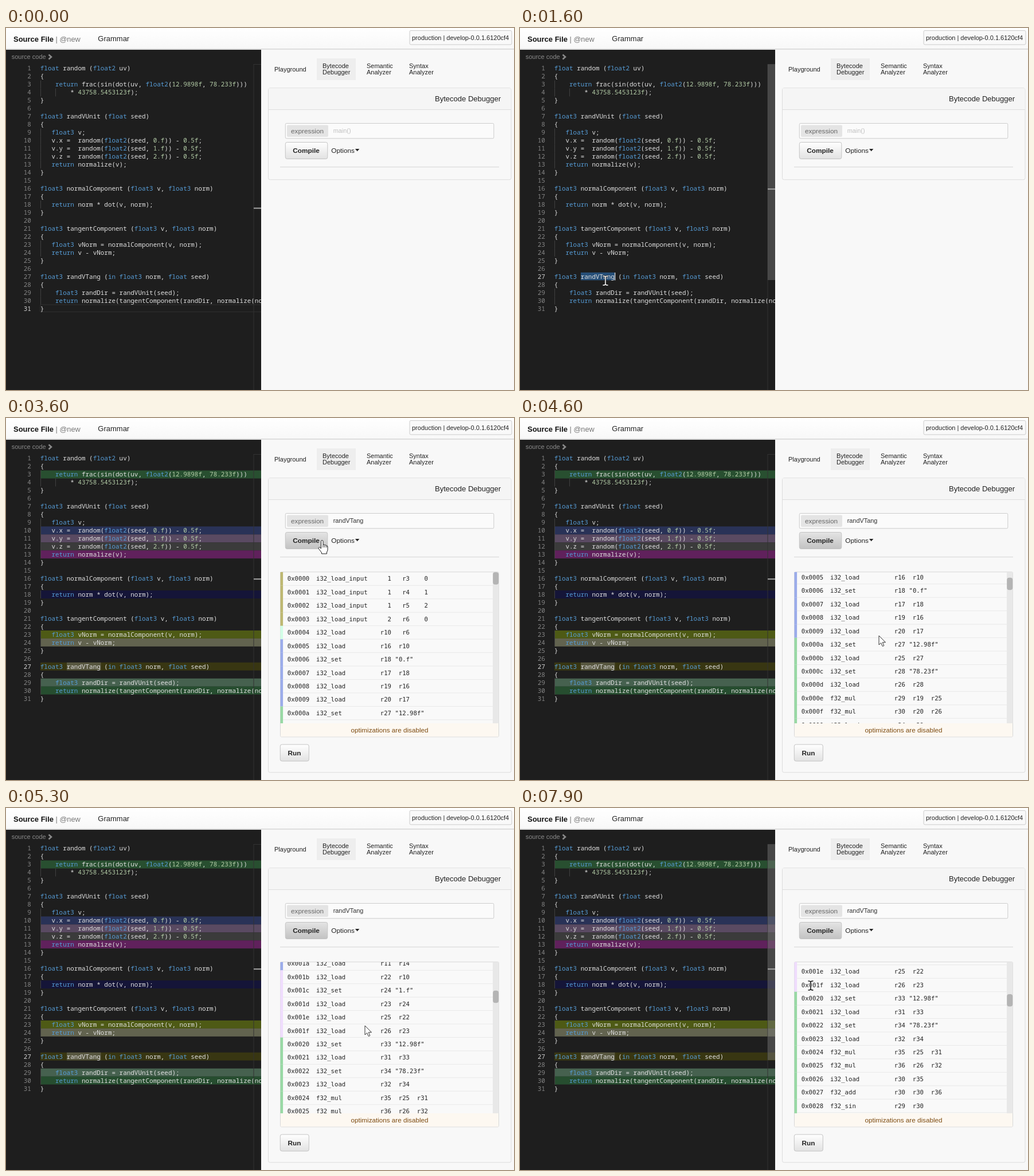
An HTML page for the animation above (8 s loop, 886 by 632 pixels).

```html
<!DOCTYPE html>
<html lang="en">
<head>
<meta charset="utf-8">
<title>Bytecode debugger</title>
<style>
html, body { margin: 0; width: 100%; height: 100%; overflow: hidden; background: #f8f8f8; }
svg { display: block; width: 886px; height: 632px; }
text { white-space: pre; font-family: "Liberation Sans", Arial, sans-serif; fill: #222; }
.code text { font: 10.94px "Noto Sans Mono", monospace; fill: #e0e0e0; }
.code .num { fill: #858585; text-anchor: end; }
.code .num.on { fill: #d0d0d0; font-weight: 500; }
.k { fill: #569cd6; }
.n { fill: #b5cea8; }
#rows text { font: 10.63px "DejaVu Sans Mono", monospace; fill: #222; }
.end { text-anchor: end; }
</style>
</head>
<body>
<svg id="stage" viewBox="0 0 886 632" xmlns="http://www.w3.org/2000/svg"></svg>
<script>
const LOOP = 8000, STEP = 100;
const LINE = 13.97, ROW = 23.45, LIST_TOP = 269;

const source = `float random (float2 uv)
{
    return frac(sin(dot(uv, float2(12.9898f, 78.233f)))
        * 43758.5453123f);
}

float3 randVUnit (float seed)
{
   float3 v;
   v.x =  random(float2(seed, 0.f)) - 0.5f;
   v.y =  random(float2(seed, 1.f)) - 0.5f;
   v.z =  random(float2(seed, 2.f)) - 0.5f;
   return normalize(v);
}

float3 normalComponent (float3 v, float3 norm)
{
   return norm * dot(v, norm);
}

float3 tangentComponent (float3 v, float3 norm)
{
   float3 vNorm = normalComponent(v, norm);
   return v - vNorm;
}

float3 randVTang (in float3 norm, float seed)
{
    float3 randDir = randVUnit(seed);
    return normalize(tangentComponent(randDir, normalize(norm)));
}`.split('\n');

const marks = {
  3: '#284f30', 10: '#293257', 11: '#5a4a62', 12: '#3b3b3b', 13: '#60215c', 18: '#151538',
  23: '#4e5a15', 24: '#62634f', 27: '#383612', 29: '#46614f', 30: '#264d2f'
};

const program = `i32_load_input 1 r3 0
i32_load_input 1 r4 1
i32_load_input 1 r5 2
i32_load_input 2 r6 0
i32_load r10 r6
i32_load r16 r10
i32_set r18 "0.f"
i32_load r17 r18
i32_load r19 r16
i32_load r20 r17
i32_set r27 "12.98f"
i32_load r25 r27
i32_set r28 "78.23f"
i32_load r26 r28
f32_mul r29 r19 r25
f32_mul r30 r20 r26
i32_load r24 r29
f32_add r24 r24 r30
f32_sin r23 r24
i32_set r31 "43758.54f"
f32_mul r22 r23 r31
f32_frac r21 r22
i32_load r15 r21
jump 0x18
i32_set r32 "0.5f"
f32_sub r14 r15 r32
i32_load r11 r14
i32_load r22 r10
i32_set r24 "1.f"
i32_load r23 r24
i32_load r25 r22
i32_load r26 r23
i32_set r33 "12.98f"
i32_load r31 r33
i32_set r34 "78.23f"
i32_load r32 r34
f32_mul r35 r25 r31
f32_mul r36 r26 r32
i32_load r30 r35
f32_add r30 r30 r36
f32_sin r29 r30
i32_set r37 "43758.54f"`.split('\n');

// first row and colour of each block in the listing
const blocks = [[0, '#bdb872'], [4, '#d2ffe6'], [5, '#9bacea'], [10, '#98d8a4'],
  [24, '#9bacea'], [27, '#efdcfd'], [32, '#98d8a4']];

const rect = (x, y, w, h, fill, more = '') =>
  `<rect x="${x}" y="${y}" width="${w}" height="${h}" fill="${fill}" ${more}/>`;
const text = (x, y, size, s, more = '') =>
  `<text x="${x}" y="${y}" font-size="${size}" ${more}>${s}</text>`;
const bold = 'font-weight="bold"';
const edge = (color, r = 0) => `stroke="${color}" rx="${r}"`;

const paint = s => s.replace(/\b(float[23]?|return|in)\b|\b\d+\.\d*f/g,
  (m, key) => `<tspan class="${key ? 'k' : 'n'}">${m}</tspan>`);

function codeLines() {
  return source.map((s, i) => {
    const y = 74.4 + i * LINE, top = 63.6 + i * LINE;
    let out = `<text class="num" x="43.8" y="${y}">${i + 1}</text>`;
    if (s[0] === ' ') out += rect(60, top, 1, LINE, '#404040');
    if (i === 3) out += rect(86, top, 1, LINE, '#404040');
    return out + `<text x="59.8" y="${y}">${paint(s)}</text>`;
  }).join('');
}

function listing() {
  return program.map((s, i) => {
    const [op, a, b, c] = s.split(' ');
    const y = LIST_TOP + i * ROW, base = y + 15.4;
    const color = blocks.filter(k => k[0] <= i).pop()[1];
    const cell = (x, v, cls = '') => v ? `<text class="${cls}" x="${x}" y="${base}">${v}</text>` : '';
    return rect(478.5, y, 4.6, ROW + .1, color) +
      rect(483, y + ROW - .6, 366, 1, '#e9e9e9') +
      cell(490.8, '0x' + i.toString(16).padStart(4, '0')) + cell(541, op) +
      cell(672, a, 'end') +
      (b && b[0] === '"' ? cell(678.5, b) : cell(704, b, 'end')) + cell(736, c, 'end');
  }).join('');
}

const button = (id, x, y, w, label, tx) =>
  rect(x, y, w, 29, 'url(#btn)', `id="${id}" ` + edge('#c3c3c3', 3)) +
  text(tx, y + 18.5, 11.8, label, bold);

const gradient = (id, a, b) => `<linearGradient id="${id}" x2="0" y2="1">
  <stop stop-color="${a}"/><stop offset="1" stop-color="${b}"/></linearGradient>`;

const beam = 'M-4.5 -8 Q-1 -8 0 -6.5 Q1 -8 4.5 -8 M0 -6.5 V6.5 M-4.5 8 Q-1 8 0 6.5 Q1 8 4.5 8';
const ibeam = (id, ink, halo) => `<g id="${id}" fill="none">
  <path d="${beam}" stroke="${halo}" stroke-width="3"/>
  <path d="${beam}" stroke="${ink}" stroke-width="1.5"/></g>`;

const $ = id => document.getElementById(id);

$('stage').innerHTML = `
<defs>${gradient('btn', '#fff', '#e2e2e2')}${gradient('btnOn', '#e4e4e4', '#c2c2c2')}
${gradient('head', '#fff', '#f8f8f8')}
<clipPath id="pane"><rect y="38" width="445" height="594"/></clipPath>
<clipPath id="view"><rect x="478" y="269" width="382" height="264"/></clipPath></defs>
${rect(0, 0, 886, 632, '#f8f8f8')}
${rect(0, 0, 886, 36, 'url(#head)')}${rect(0, 36, 886, 1.5, '#d6d6d6')}
${text(13, 24.3, 13, 'Source File', bold + ' style="fill:#111"')}
${text(86.5, 24.3, 12.8, '| @new', 'style="fill:#777"')}
${text(160.3, 22.6, 13, 'Grammar')}
${rect(704, 4.5, 178, 24.5, '#f9f9f9', edge('#ccc', 2))}
${text(708, 20.6, 11, 'production | develop-0.0.1.6120cf4')}
<g class="code" clip-path="url(#pane)">
  ${rect(0, 37.5, 445, 595, '#1e1e1e')}
  <g id="marks">${Object.keys(marks).map(n =>
    rect(60, 63.6 + (n - 1) * LINE, 385, LINE, marks[n])).join('')}</g>
  <rect id="current" x="60" width="390" height="12.5" fill="none" stroke="#303030"/>
  <rect id="select" x="106" y="426.8" width="59.5" height="13.6"/>
  ${codeLines()}
  ${rect(165, 427, 1.3, 13.5, '#ddd', 'id="caret"')}
  ${rect(431.5, 63, 1, 569, '#333')}${rect(432, 63, 13, 1, '#333')}
  ${rect(432, 63.5, 13, 376.5, '#797979', 'id="slider"')}
  ${rect(432, 0, 13, 2, '#a5a5a5', 'id="ruler"')}
</g>
${text(9.7, 54, 11, 'source code', 'style="fill:#8a8a8a"')}
<path d="M74.5 46.5 L79 50.5 L74.5 54.5" fill="none" stroke="#8a8a8a" stroke-width="2.6"/>
${rect(542, 53, 68, 38, '#eee')}
${text(468, 75.6, 11, 'Playground')}
${[[552, 'Bytecode', 'Debugger'], [629, 'Semantic', 'Analyzer'], [703, 'Syntax', 'Analyzer']]
  .map(([x, a, b]) => text(x, 70, 11, a) + text(x, 81, 11, b)).join('')}
${rect(457.5, 104.8, 423.5, 160, '#f8f8f8', 'id="panel" ' + edge('#ddd', 3))}
${rect(458, 105.3, 422.5, 37, '#f5f5f5')}${rect(458, 142, 423, 1, '#ddd')}
${text(863, 128.4, 13, 'Bytecode Debugger', 'class="end"')}
${rect(487.3, 166.5, 363.5, 26.3, '#fbfbfb', edge('#ccc', 2))}
${rect(490, 169.5, 72, 20.5, '#e4e4e4', 'rx="2"')}
${text(497, 183.7, 11.8, 'expression', 'style="fill:#666"')}
<text id="field" x="570.7" y="183.4" font-size="10.9"></text>
${rect(622.5, 173, 1, 13, '#222', 'id="fieldCaret"')}
${button('compile', 487.3, 199.5, 73.5, 'Compile', 500.3)}
${text(567.3, 218, 11.8, 'Options')}
<path d="M609 211 h7.4 l-3.7 4.2 z" fill="#222"/>
${rect(478, 242, 382, 1.3, '#dcdcdc')}
<g id="result">
  ${rect(478.5, 268.8, 381, 288, '#f9f9f9', edge('#d8d8d8', 2))}
  <g clip-path="url(#view)"><g id="rows">${listing()}</g></g>
  ${rect(849, 269, 10.5, 264, '#e8e8e8')}
  ${rect(849.2, 269.2, 10, 21.5, '#b4b4b4', 'id="thumb" rx="4"')}
  ${rect(479, 533, 380, 23.3, '#fdf8f1')}
  ${text(669, 549, 11.68, 'optimizations are disabled', 'text-anchor="middle" style="fill:#7d4c12"')}
  ${button('run', 478.3, 570, 50, 'Run', 491.6)}
</g>
<g id="cursor">
  <path id="arrow" d="M0 0 V16 L3.7 12.6 L6.3 18.6 L8.8 17.5 L6.3 11.7 H11.5 Z" fill="#fff" stroke="#333"/>
  ${ibeam('light', '#fff', '#222')}${ibeam('dark', '#111', '#fff')}
  <path id="hand" d="M-1.5 12 V1.5 Q-1.5 -.5 .2 -.5 Q2 -.5 2 1.5 V7.5 Q4 6.2 5 8 Q7 7 8 9 Q10 8.5 10 11 V16 Q10 18 8.5 20 V23 H-.5 V21 L-5.5 14.5 Q-6.7 12.2 -5 11.6 Q-3.5 11.2 -1.5 14 Z M2 7.5 V12 M5 8.5 V12 M8 9.5 V12"
    fill="#fff" stroke="#222"/>
</g>`;

const track = [
  [300, 525, 301], [600, 420, 350], [1000, 180, 465], [1100, 170, 462], [1400, 149, 441],
  [2000, 149, 441], [2700, 629, 181], [2900, 629, 181], [3400, 551, 214], [3700, 551, 214],
  [4000, 626, 380], [6300, 626, 380], [6400, 605, 380], [6600, 500, 384], [7000, 242, 385],
  [7200, 286, 338], [7500, 410, 222], [7700, 534, 210], [7900, 507, 310]
];
const wheel = [[4400, 0], [4900, 299.6], [5400, 698.6]];

// value of a keyed path at time t, linear between keys
function along(keys, t) {
  if (t <= keys[0][0]) return keys[0].slice(1);
  for (let i = 1; i < keys.length; i++) {
    const a = keys[i - 1], b = keys[i];
    if (t <= b[0]) {
      const p = (t - a[0]) / (b[0] - a[0]);
      return a.slice(1).map((v, k) => v + (b[k + 1] - v) * p);
    }
  }
  return keys[keys.length - 1].slice(1);
}

const inside = (x, y, l, t, r, b) => x >= l && x <= r && y >= t && y <= b;
const show = (id, on) => $(id).setAttribute('display', on ? 'inline' : 'none');
const set = (id, name, value) => $(id).setAttribute(name, value);
const nums = document.querySelectorAll('.num');

function draw(time) {
  const t = Math.floor((time % LOOP) / STEP) * STEP;
  const [x, y] = along(track, t);
  const open = t >= 3500;

  const inCode = inside(x, y, 0, 38, 445, 632);
  const onText = inside(x, y, 487, 167, 851, 193) || open && inside(x, y, 487, 269, 527, 533);
  const onButton = t >= 3200 && t <= 3800 && inside(x, y, 487, 199, 561, 229);
  const shape = inCode ? 'light' : onText ? 'dark' : onButton ? 'hand' : 'arrow';
  ['arrow', 'light', 'dark', 'hand'].forEach(id => show(id, id === shape));
  show('cursor', t >= 300);
  set('cursor', 'transform', `translate(${x} ${y})`);

  const line = t < 1100 ? 31 : t < 1400 ? 30 : 27;
  nums.forEach((n, i) => n.classList.toggle('on', i === line - 1));
  show('current', t < 1500);
  set('current', 'y', 64 + (line - 1) * LINE);
  set('ruler', 'y', 313.6 - (31 - line) * 8.35);
  show('select', t >= 1500);
  set('select', 'fill', t < 2800 ? '#264f78' : open ? '#585740' : '#3f4246');
  show('caret', t >= 1500 && t < 2700);

  const hover = t < 2500 ? (t - 500) / 200 : t < 4000 ? (2800 - t) / 300 : (t - 6700) / 200;
  set('slider', 'opacity', .45 * Math.max(0, Math.min(1, hover)));

  const filled = t >= 2800;
  $('field').textContent = filled ? 'randVTang' : 'main()';
  $('field').style.fill = filled ? '#333' : '#c0c0c0';
  show('fieldCaret', filled && t < 3300);
  set('compile', 'fill', t >= 3400 ? 'url(#btnOn)' : 'url(#btn)');

  show('marks', open);
  show('result', open);
  set('panel', 'height', open ? 514 : 160);
  const [scroll] = along(wheel, t);
  set('rows', 'transform', `translate(0 ${-scroll})`);
  set('thumb', 'y', 269.2 + scroll * .08);
}

const start = performance.now();
function tick() {
  draw(performance.now() - start);
  requestAnimationFrame(tick);
}
draw(0);
tick();
</script>
</body>
</html>
```
